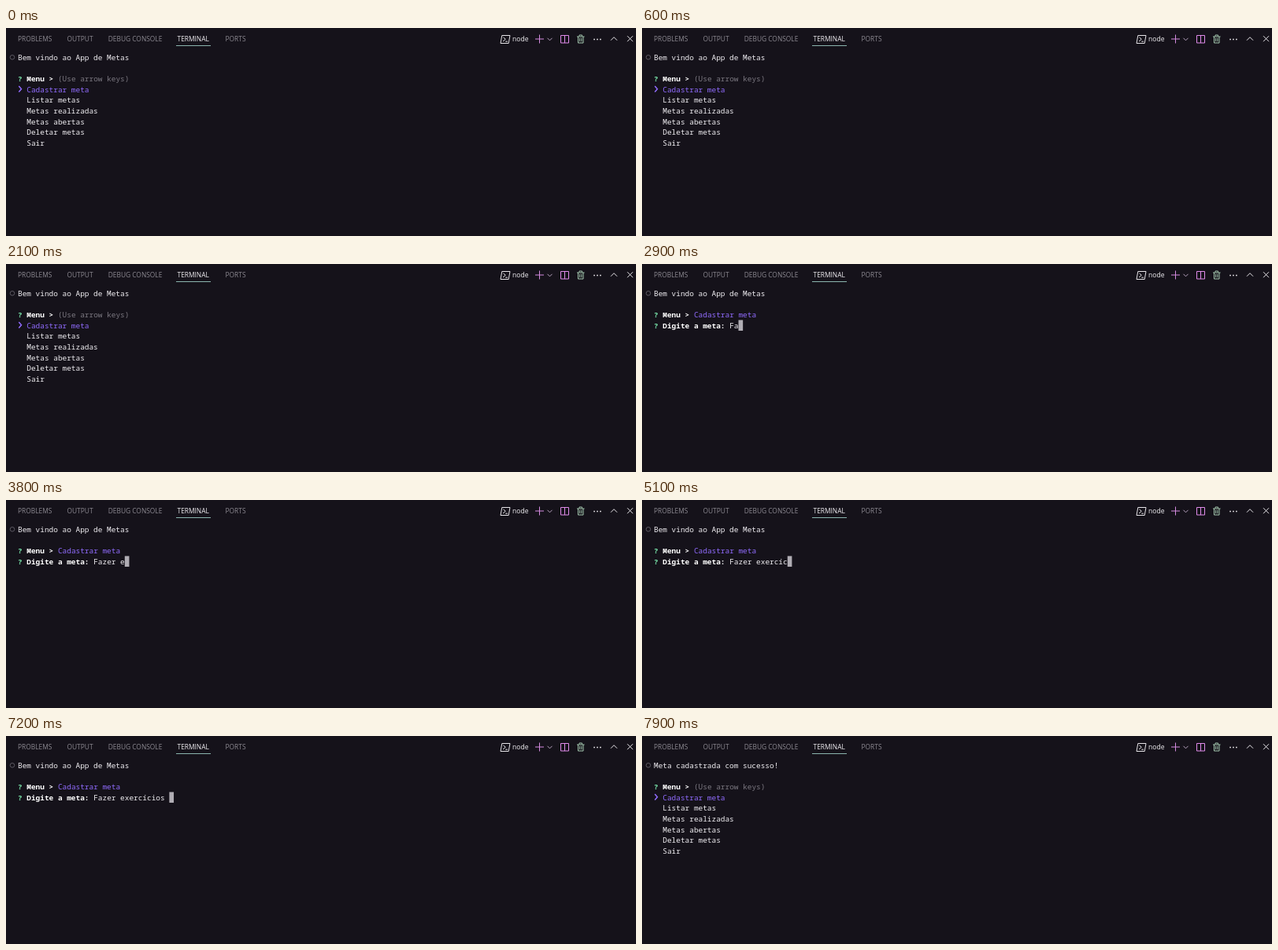
These frames come from a looping animation (800x265 px, 8000 ms). An HTML page:

```html
<!DOCTYPE html>
<html lang="pt-BR">
<head>
<meta charset="utf-8">
<title>App de Metas</title>
<style>
  html, body { margin: 0; width: 100%; height: 100%; overflow: hidden; background: #15121a; }
  svg { display: block; width: 800px; height: 265px; }
  text { white-space: pre; }
  .tabs { font: 8.4px "Open Sans", "Noto Sans", sans-serif; fill: #8d8a92; }
  .tabs .on { fill: #f2f0f4; }
  .tabs .node { font-size: 8.6px; font-weight: 500; }
  .term { font: 9.43px "Noto Sans Mono", "DejaVu Sans Mono", monospace; fill: #f0eef2; font-weight: 500; }
  .term .q { fill: #7cecb0; font-weight: 700; }
  .term .b { fill: #fff; font-weight: 700; }
  .term .dim { fill: #7b7880; }
  .term .pick { fill: #916cff; }
  .icons { fill: none; stroke: #e6e4e8; }
</style>
</head>
<body>
<svg viewBox="0 0 800 265">
  <g class="tabs">
    <text x="15" y="17">PROBLEMS</text>
    <text x="77.5" y="17">OUTPUT</text>
    <text x="129.7" y="17">DEBUG CONSOLE</text>
    <text x="217.5" y="17" class="on">TERMINAL</text>
    <text x="278.5" y="17">PORTS</text>
    <text x="643" y="17" class="on node">node</text>
  </g>
  <path d="M216 22.5H260" stroke="#8ab5ae"/>
  <g class="icons">
    <path d="M629.8 9.5H640L638.2 19.5H628Z M631.5 11.8L634.3 14.3L631 17 M634.3 17.2H637"/>
    <path d="M672 14H683M677.5 8.5V19.5" stroke="#d58be0"/>
    <path d="M687.5 12.8L690.5 15.8L693.5 12.8" stroke="#b9a5c2"/>
    <path d="M704.5 9.5H714.5V19H704.5ZM709.5 9.5V19" stroke="#e08bea"/>
    <path d="M725 11H734.5M728 10.5V9H731.5V10.5M726.5 11V19H733V11M728.6 12.8V17.2M730.9 12.8V17.2" stroke="#a5c9b0"/>
    <path d="M746.2 14.5h1.7m2.2 0h1.7m2.2 0h1.7" stroke-width="1.6"/>
    <path d="M768 15.7L772 11.7L776 15.7M789 10.2L796 17.2M796 10.2L789 17.2"/>
    <circle cx="8" cy="37.3" r="2.8" stroke="#5a5760"/>
  </g>
  <g class="term" id="term"></g>
</svg>
<script>
const term = document.getElementById('term');
const LOOP = 8000, CHOOSE = 2300, SAVE = 7600;
const COL = 5.658, ROW = 13.6, LEFT = 15;
const goal = 'Fazer exercícios ';
// time of each key press, in tenths of a second
const keys = [26.5, 28.5, 30.5, 32.5, 34, 36, 37.5, 40, 42, 44, 46, 48.5, 50.5, 53, 55, 57, 59];
const options = ['Cadastrar meta', 'Listar metas', 'Metas realizadas',
                 'Metas abertas', 'Deletar metas', 'Sair'];

const span = (cls, s) => `<tspan class="${cls}">${s}</tspan>`;
const line = (row, col, s) =>
  `<text x="${LEFT + col * COL}" y="${41 + row * ROW}">${s}</text>`;
const ask = (row, label, answer) =>
  line(row, 0, span('q', '?')) + line(row, 2, span('b', label)) +
  line(row, 3 + label.length, answer);

function menu(title) {
  return line(0, 0, title) +
    ask(2, 'Menu >', span('dim', '(Use arrow keys)')) +
    '<path d="M16.3 74L19.5 77.7L16.3 81.4" fill="none" stroke="#916cff" stroke-width="1.5"/>' +
    options.map((o, i) => line(3 + i, 2, i ? o : span('pick', o))).join('');
}

function form(typed) {
  const x = LEFT + (17 + typed.length) * COL;
  return line(0, 0, 'Bem vindo ao App de Metas') +
    ask(2, 'Menu >', span('pick', options[0])) +
    ask(3, 'Digite a meta:', typed) +
    `<rect x="${x}" y="71.4" width="${COL}" height="13.6" fill="#b0adb4"/>`;
}

let shown = '';
function draw(now) {
  const t = now % LOOP;
  const typed = goal.slice(0, keys.filter(k => k * 100 <= t).length);
  const view = t < CHOOSE ? menu('Bem vindo ao App de Metas')
    : t < SAVE ? form(typed)
    : menu('Meta cadastrada com sucesso!');
  if (view !== shown) term.innerHTML = shown = view;
  requestAnimationFrame(draw);
}
draw(0);
</script>
</body>
</html>
```
